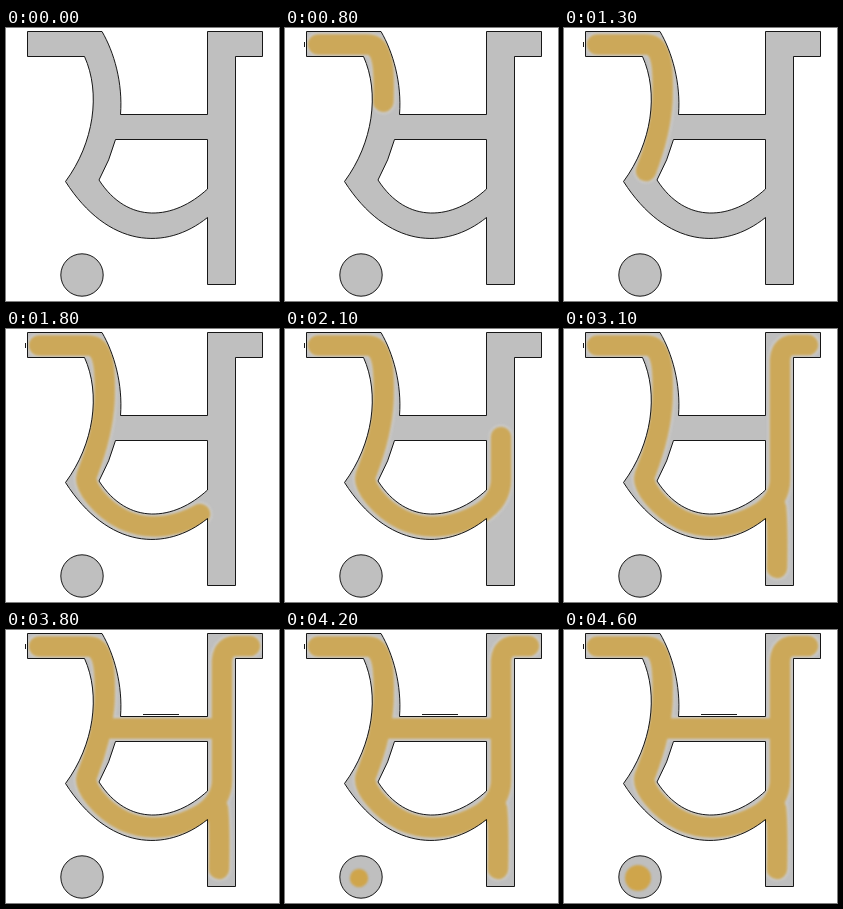
Recreate the animation shown at these times as an HTML page. Size 273 px wide and 273 px high, loop 4700 ms.

```html
<!DOCTYPE html>
<html lang="en">
<head>
<meta charset="utf-8">
<title>Letter tracing</title>
<style>
  html, body { margin: 0; width: 100%; height: 100%; overflow: hidden; background: #fff; }
  svg { display: block; width: 100vw; height: 100vh; }
  .ink path { fill: none; stroke-linecap: round; stroke-linejoin: round; }
  filter { color-interpolation-filters: sRGB; }
</style>
</head>
<body>
<svg viewBox="0 0 273 273">
  <defs>
    <path id="letter" fill-rule="evenodd" clip-rule="evenodd" d="M21.500 3.500H96C108 24 117 55 114.500 86.500H201.500V3.500H256.500V28.500H229.500V256.500H201.500V189.500C160 223 102 220 59.500 153.500C88 115 95 65 78.500 28.500H21.500Z
      M109.500 111.500H201.500V161C168 192 122 197 93 152Q104 132 109.500 111.500Z"/>
    <circle id="dot" cx="76" cy="247" r="21.200"/>
    <clipPath id="inside"><use href="#letter"/><use href="#dot"/></clipPath>
    <filter id="haze" filterUnits="userSpaceOnUse" x="0" y="0" width="273" height="273"><feGaussianBlur stdDeviation="1.200"/></filter>
    <filter id="soft" filterUnits="userSpaceOnUse" x="0" y="0" width="273" height="273"><feGaussianBlur stdDeviation="1.300"/></filter>
  </defs>
  <g fill="#bfbfbf"><use href="#letter"/><use href="#dot"/></g>
  <g class="ink" clip-path="url(#inside)">
    <g id="halo" filter="url(#haze)" stroke="#cbcac8" stroke-width="25"></g>
    <g id="gold" filter="url(#soft)" stroke="#cca859" stroke-width="20.500">
      <circle id="blob" cx="74" cy="248" fill="#cfa54b" stroke="none"/>
    </g>
  </g>
  <g fill="none" stroke="#000" stroke-width=".9">
    <use href="#letter"/><use href="#dot"/>
    <path id="startMark" d="M19.500 14V19"/>
    <path id="barMark" d="M137 84.500H173"/>
  </g>
</svg>
<script>
  const LOOP = 4700, STEP = 100;
  const byId = id => document.getElementById(id);

  // Pen strokes: [start ms, end ms, path]
  const strokes = [
    [0, 1300, 'M33 16.500H82C101 16 99 50 98.500 72C97 100 89 125 82 143'],
    [1300, 1800, 'M82 143C74 156 97 181 118 191C147 204 176 195 194 185'],
    [1800, 2500, 'M194 185Q216 172 216 150V36Q215 16 230 16H244'],
    [2500, 3100, 'M212 178Q214 200 213 239'],
    [3100, 3800, 'M100 98.500H211']
  ].map(([from, to, d]) => ({
    from, to,
    paths: ['halo', 'gold'].map(id => {
      const path = document.createElementNS('http://www.w3.org/2000/svg', 'path');
      path.setAttribute('d', d);
      path.setAttribute('pathLength', 1);
      return byId(id).appendChild(path);
    })
  }));

  const progress = (t, from, to) => Math.min(1, Math.max(0, (t - from) / (to - from)));
  const show = (el, on) => el.setAttribute('visibility', on ? 'visible' : 'hidden');

  function render(time) {
    const t = Math.floor((time % LOOP) / STEP) * STEP;
    for (const { from, to, paths } of strokes) {
      const p = progress(t, from, to);
      for (const path of paths) {
        show(path, p > 0);
        path.setAttribute('stroke-dasharray', `${p} 2`);
      }
    }
    byId('blob').setAttribute('r', 13 * Math.sqrt(progress(t, 3800, 4600)));
    show(byId('startMark'), t >= 700);
    show(byId('barMark'), t >= 3500);
  }

  const origin = performance.now();
  function tick() {
    render(performance.now() - origin);
    requestAnimationFrame(tick);
  }
  tick();
</script>
</body>
</html>
```
